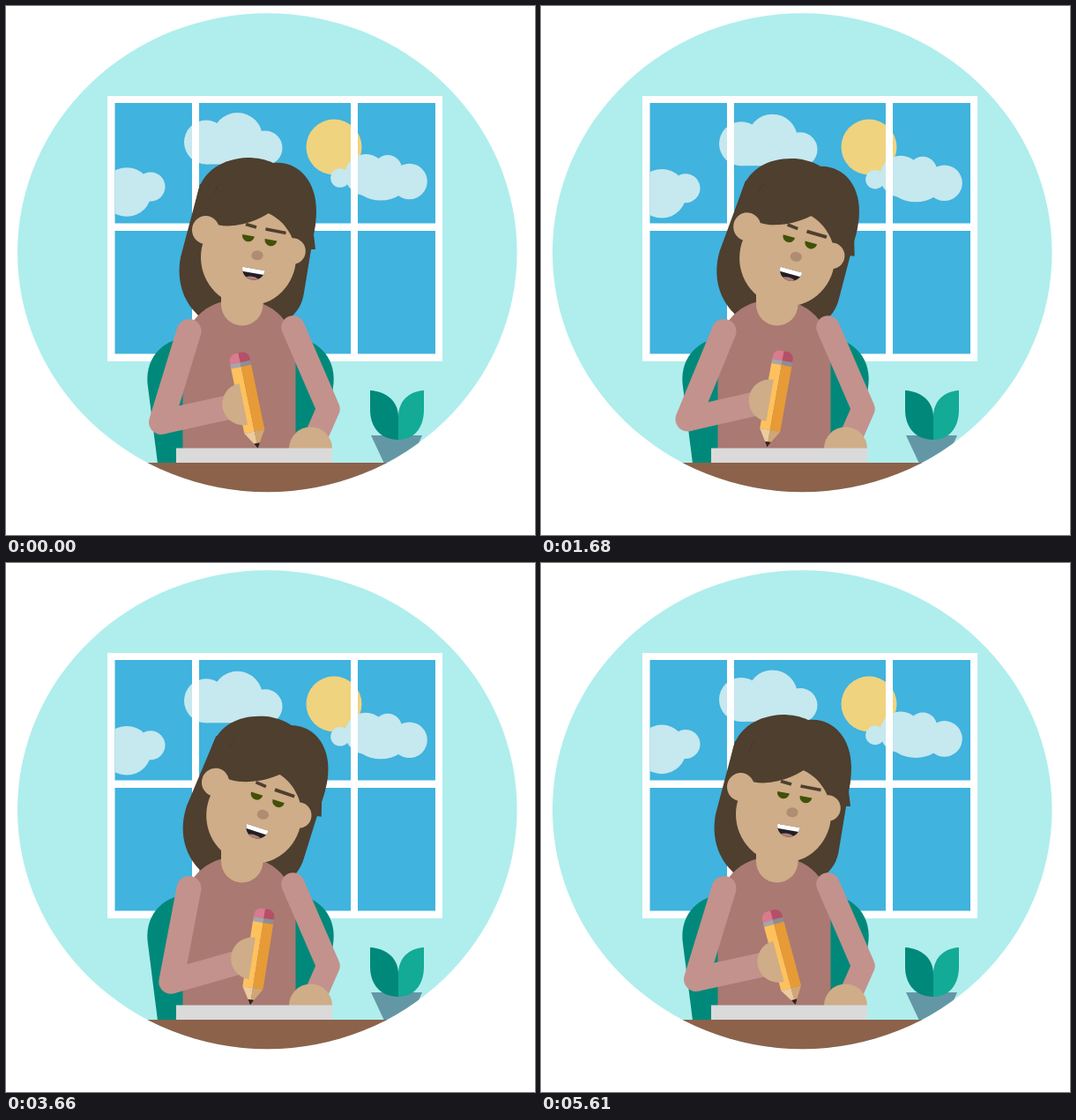
Write an HTML page with a canvas that moves like this. It is 600 by 600 pixels and loops after 5640 ms.

```html
<!DOCTYPE html>
<html lang="en">
<head>
<meta charset="utf-8">
<title>Writing at the window</title>
<style>
html, body { margin: 0; width: 100%; height: 100%; overflow: hidden; background: #fff; }
canvas { display: block; width: 600px; height: 600px; }
</style>
</head>
<body>
<canvas id="stage" width="600" height="600"></canvas>
<script>
const ctx = document.getElementById('stage').getContext('2d');
const LOOP = 5640, STEP = 30, RAD = Math.PI / 180;
const SKIN = '#cead88', HAIR = '#4e3f2f', SLEEVE = '#c3928d', TEAL = '#00897a', CLOUD = '#c6e8ef';

// Smooth looping curve through [time, value] keys, flat at the extremes.
function track(keys) {
  const n = keys.length;
  const at = i => {
    const turn = Math.floor(i / n), k = keys[i - turn * n];
    return [k[0] + turn * LOOP, k[1]];
  };
  const slope = i => {
    const a = at(i), b = at(i + 1);
    return (b[1] - a[1]) / (b[0] - a[0]);
  };
  const tangent = i => {
    const l = slope(i - 1), r = slope(i);
    return l * r <= 0 ? 0 : 2 * l * r / (l + r);
  };
  return t => {
    let i = n - 1;
    while (i > 0 && keys[i][0] > t) i--;
    const a = at(i), b = at(i + 1), h = b[0] - a[0], s = (t - a[0]) / h;
    const q = s * s, c = q * s;
    return a[1] * (2 * c - 3 * q + 1) + b[1] * (3 * q - 2 * c) +
      h * (tangent(i) * (c - 2 * q + s) + tangent(i + 1) * (c - q));
  };
}

const drift = track([[0, 0], [570, 5.3], [900, 7.1], [1140, 6.2], [1680, 1.7], [1860, 0],
  [2280, 3.5], [2790, 7], [3420, 4.5], [3660, 1.8], [3830, 0], [3990, 1.2],
  [4260, 3], [4560, 5.3], [4850, 7], [5130, 5.8], [5610, 0.4]]);
const nod = track([[0, 0], [810, 8], [1000, 8.3], [1680, 5.3], [2600, 0.6], [2790, 1],
  [3660, 8], [4260, 5.5], [5610, 0]]);
const upperArm = track([[0, 17], [810, 30.7], [1680, 22.4], [2790, 7.75], [3660, 10.8],
  [4260, 12.7], [5610, 17]]);
const foreArm = track([[0, 12.4], [810, 9.2], [1680, 12.8], [2790, 14.6], [3660, 16],
  [4260, 14.5], [5610, 12.2]]);
const wrist = track([[0, -13.4], [810, 11.5], [1680, 6.8], [2790, -9.2], [3660, 14.9],
  [4260, 29.5], [5610, -13.2]]);
const scribble = t => 6 * Math.sin(2 * Math.PI * 18 * (t + 15) / LOOP);

function rect(color, x, y, w, h) {
  ctx.fillStyle = color;
  ctx.fillRect(x, y, w, h);
}
function oval(color, x, y, rx, ry = rx, from = 0, to = 360) {
  ctx.fillStyle = color;
  ctx.beginPath();
  ctx.ellipse(x, y, rx, ry, 0, from * RAD, to * RAD);
  ctx.fill();
}
function shape(color, d) {
  ctx.fillStyle = color;
  ctx.fill(new Path2D(d));
}
function line(color, width, d, cap = 'round') {
  ctx.strokeStyle = color;
  ctx.lineWidth = width;
  ctx.lineCap = cap;
  ctx.lineJoin = 'round';
  ctx.stroke(new Path2D(d));
}
function turned(x, y, deg, draw) {
  ctx.save();
  ctx.translate(x, y);
  ctx.rotate(deg * RAD);
  draw();
  ctx.restore();
}
const withHead = (deg, draw) => turned(270, 330, deg, () => {
  ctx.translate(-270, -330);
  draw();
});

function drawWindow(dy) {
  rect('#fff', 115, 102, 380, 301);
  ctx.save();
  ctx.beginPath();
  ctx.rect(123.5, 110, 363.5, 284.5);
  ctx.clip();
  rect('#40b3de', 115, 102, 380, 301);
  oval('#efd37f', 372, 160, 31.5);
  ctx.translate(0, dy);
  oval(CLOUD, 227, 154.5, 25);
  oval(CLOUD, 262.5, 149.5, 28.5);
  oval(CLOUD, 294, 161, 19.5);
  rect(CLOUD, 227, 160, 67, 19.5);
  oval(CLOUD, 137, 211, 27.8);
  oval(CLOUD, 164, 205, 16.5);
  oval(CLOUD, 379, 195, 10.8);
  oval(CLOUD, 408, 191.5, 23.5);
  oval(CLOUD, 433, 185, 16);
  oval(CLOUD, 425, 200, 30, 20.5);
  oval(CLOUD, 457.5, 199, 20.3);
  ctx.restore();
  rect('#fff', 211, 110, 8, 285);
  rect('#fff', 391, 110, 8, 285);
  rect('#fff', 123, 246.5, 364, 8.5);
}

function drawPlant() {
  shape('#6497a5', 'M414 487H472L458 519H429Z');
  shape(TEAL, 'M413 436C432 437 445 449 445 466V492C425 492 413 478 413 458Z');
  shape('#13aa96', 'M474 436C456 437 445 449 445 466V492C463 492 474 478 474 458Z');
}

function drawBackHair() {
  shape(HAIR, 'M220 202L198 285C193 312 201 340 226 357H318C331 348 336 338 338 325L351 246L340 200Z');
}

function drawHead() {
  oval(SKIN, 275, 285, 54, 55);
  shape(HAIR, 'M229 240C230 245 236 249 252 249.5C276 248 292 240 308 228' +
    'C312 244 319 257 331 264C338 266 343 270 344 276L351 276L349 259C351 250 352 240 352 232' +
    'C352 198 331 175 303 178C295 174 284 172 274 172C246 173 224 187 218 210L211 240Z');
  line('#46382a', 0.8, 'M236 213L241 203');
  oval(SKIN, 226.5, 254, 15.5, 16);
  oval(SKIN, 325, 278, 14.8);
  line(HAIR, 3.6, 'M272 247.5L284 251', 'butt');
  line(HAIR, 3.8, 'M294.5 253L317.5 257.5', 'butt');
  turned(275, 260.3, 10, () => oval('#415107', 0, 0, 7, 7, 0, 180));
  turned(300.5, 265.3, 10, () => oval('#415107', 0, 0, 7, 7, 0, 180));
  oval('#af8d72', 285, 282.8, 6.7, 5.5);
  turned(281, 298, 10, () => {
    ctx.beginPath();
    ctx.moveTo(-13, 0);
    ctx.bezierCurveTo(-12, 17, 12, 17, 13, 0);
    ctx.closePath();
    ctx.clip();
    rect('#231f25', -14, -1, 28, 16);
    oval('#b08078', 0, 14.5, 10, 5.5);
    rect('#fff', -14, -1, 28, 6);
  });
}

function drawPencil() {
  const half = 11.7;
  ctx.save();
  ctx.translate(6, 0);
  ctx.save();
  ctx.beginPath();
  ctx.roundRect(-half, -58, 2 * half, 30, [8, 8, 0, 0]);
  ctx.clip();
  rect('#da7a8f', -half, -58, half, 11);
  rect('#b64f68', 0, -58, half, 11);
  ctx.restore();
  rect('#a5a5ad', -half, -47, half, 5);
  rect('#8d8d97', 0, -47, half, 5);
  rect('#fec15e', -half, -42, half, 75);
  rect('#e69b36', 0, -42, half, 75);
  shape('#eccb9d', 'M-11.7 33H0V52Z');
  shape('#d0a774', 'M0 33H11.7L0 52Z');
  shape('#2b2523', 'M-3.4 46.5H3.4L0 52.5Z');
  ctx.restore();
}

function drawWritingArm(t) {
  const u = upperArm(t) * RAD, f = foreArm(t) * RAD;
  const ex = 207.5 - 107.7 * Math.sin(u), ey = 369 + 107.7 * Math.cos(u);
  const hx = ex + 95.5 * Math.cos(f), hy = ey - 95.5 * Math.sin(f);
  line(SLEEVE, 28, `M207.5 369L${ex} ${ey}`);
  line(SLEEVE, 27.5, `M${ex} ${ey}L${hx} ${hy}`, 'butt');
  turned(hx, hy, wrist(t) + scribble(t), () => {
    drawPencil();
    oval(SKIN, 0, 0, 24, 24, 90, 270);
  });
}

function drawRestingArm() {
  line(SLEEVE, 26.5, 'M325.5 364.5L365.5 457L351 490');
  oval(SKIN, 345.5, 502, 24.5, 24.5, 180, 360);
}

function draw(t) {
  const tilt = nod(t);
  ctx.clearRect(0, 0, 600, 600);
  ctx.save();
  ctx.beginPath();
  ctx.ellipse(296.3, 279.7, 283.3, 271.5, 0, 0, 2 * Math.PI);
  ctx.clip();
  rect('#afeeed', 0, 0, 600, 600);
  drawWindow(drift(t));
  drawPlant();
  shape(TEAL, 'M172 519L160.5 428C158 397 180 376 210 376H322C352 376 374 397 371.5 428L360 519Z');
  withHead(tilt, drawBackHair);
  shape('#a97972', 'M200.5 510V398C200.5 360 225 333 264.5 333C304 333 328.5 360 328.5 398V510Z');
  rect(SKIN, 244, 315, 47.5, 24);
  oval(SKIN, 267.75, 338.7, 23.75);
  withHead(tilt, drawHead);
  drawRestingArm();
  drawWritingArm(t);
  rect('#dadada', 193, 501.5, 177, 17);
  rect('#8d624b', 0, 518, 600, 82);
  ctx.restore();
}

const start = performance.now();
function frame(now) {
  const t = Math.max(0, now - start) % LOOP;
  draw(Math.floor(t / STEP) * STEP);
  requestAnimationFrame(frame);
}
draw(0);
requestAnimationFrame(frame);
</script>
</body>
</html>
```
